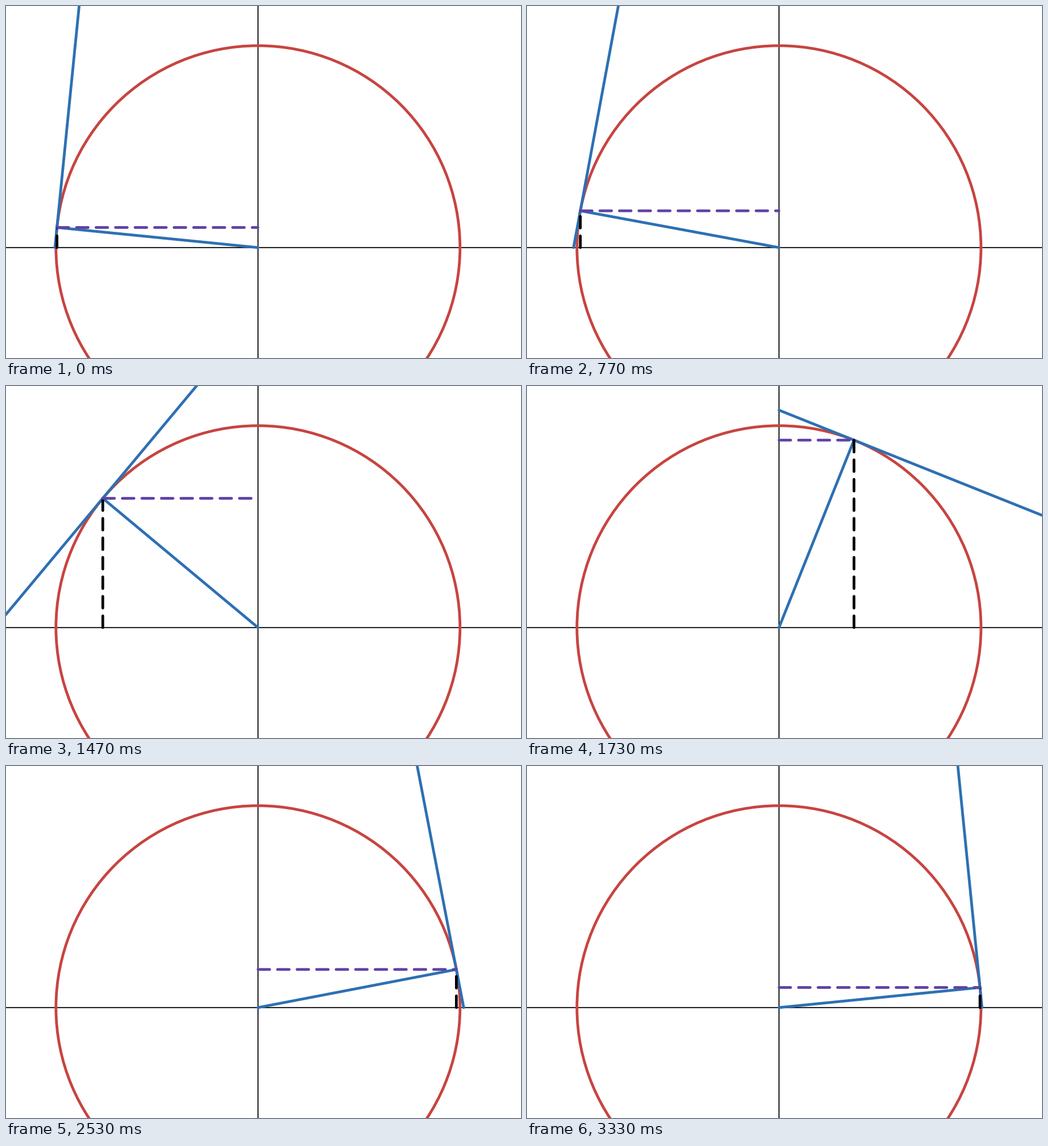
These frames come from a looping animation (905x619 px, 3360 ms). A matplotlib script:

```python
import math

import matplotlib.pyplot as plt
from matplotlib.animation import FuncAnimation
from matplotlib.patches import Circle

W, H = 905, 619
DPI = 64
CX, CY = 442.8, 424.8   # origin, measured from the top left corner
R = 355
STEPS = 101
LOOP_MS = 3360

RED, BLUE, PURPLE, BLACK = "#c74440", "#2d70b3", "#6042a6", "#000000"
AXIS_W, LINE_W = 1.8, 4.8
DASH, GAP = 20.6, 13.7


def pt(px):
    return px * 72 / DPI


fig = plt.figure(figsize=(W / DPI, H / DPI), dpi=DPI, facecolor="white")
ax = fig.add_axes([0, 0, 1, 1])
ax.set_xlim(-CX, W - CX)
ax.set_ylim(CY - H, CY)
ax.axis("off")

for xs, ys in (([-CX, W - CX], [0, 0]), ([0, 0], [CY - H, CY])):
    ax.plot(xs, ys, color=BLACK, lw=pt(AXIS_W), snap=False, zorder=1)
ax.add_patch(Circle((0, 0), R, fill=False, ec=RED, lw=pt(LINE_W), zorder=2))


def stroke(color, zorder, dashed=False):
    line, = ax.plot([], [], color=color, lw=pt(LINE_W), zorder=zorder,
                    snap=False, solid_capstyle="round")
    if dashed:
        line.set_dashes([DASH / LINE_W, GAP / LINE_W])
        line.set_dash_capstyle("round")
    return line


radius = stroke(BLUE, 3)
tangent = stroke(BLUE, 4)
height = stroke(BLACK, 5, dashed=True)
width = stroke(PURPLE, 6, dashed=True)


def update(i):
    # The tangent has slope -a, with a running evenly from -10 to 10.
    a = (i - 50) / 5
    k = math.hypot(1, a)
    x, y = R * a / k, R / k
    x_cut = R * k / a if a else 10 * R
    y_cut = R * k if a else R
    radius.set_data([0, x], [0, y])
    tangent.set_data([0, x_cut], [y_cut, 0 if a else R])
    height.set_data([x, x], [0, y])
    width.set_data([min(x, 0), max(x, 0)], [y, y])
    return radius, tangent, height, width


anim = FuncAnimation(fig, update, frames=STEPS, interval=LOOP_MS / STEPS,
                     repeat=True, repeat_delay=0)
plt.show()
```
